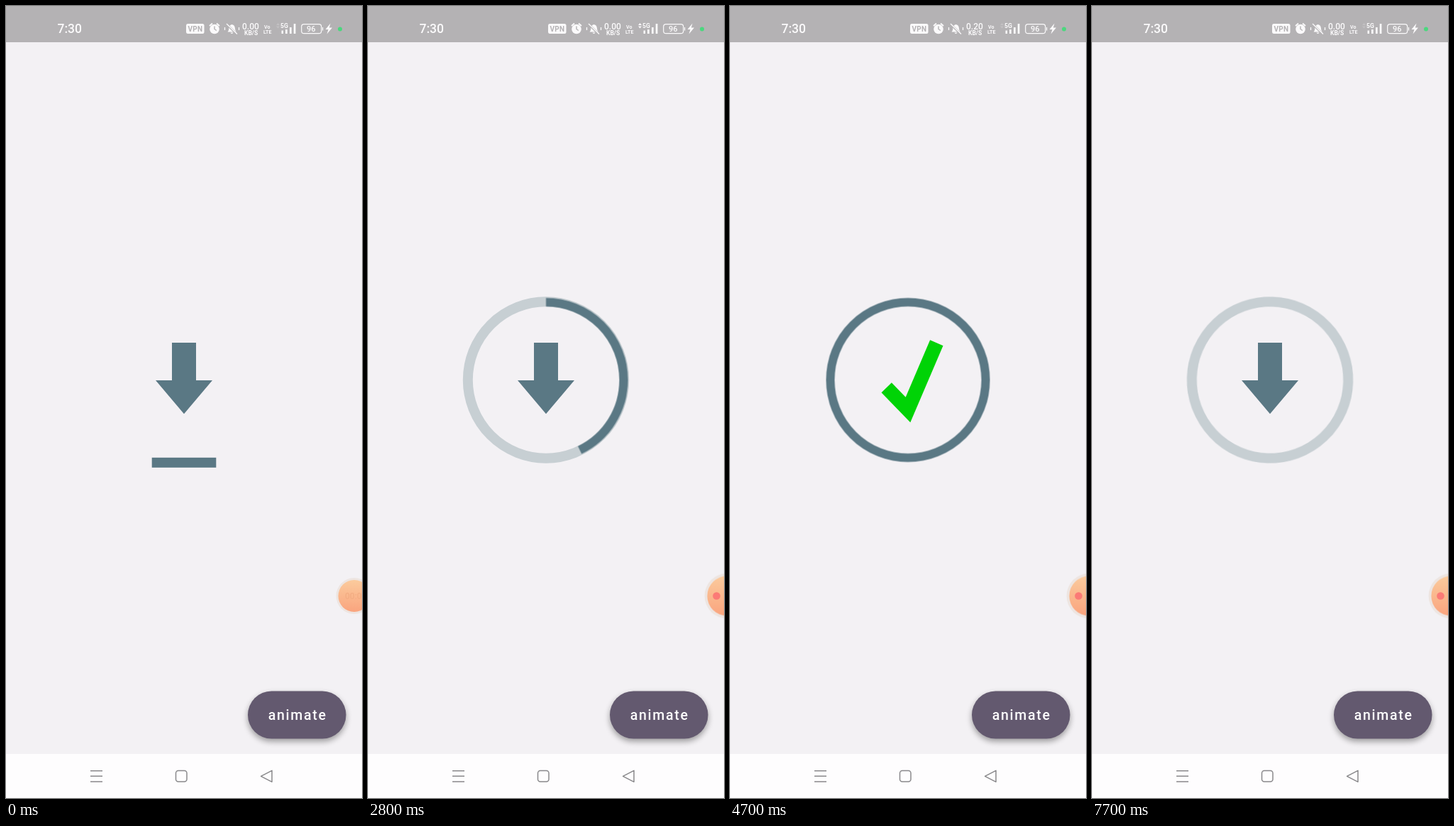
These frames come from a looping animation (502x1115 px, 8000 ms). An HTML page without scripts:

```html
<!DOCTYPE html>
<html lang="en">
<head>
<meta charset="utf-8">
<title>Download animation</title>
<style>
html, body { margin: 0; width: 100%; height: 100%; overflow: hidden; background: #f3f1f4; }
svg { display: block; width: 502px; height: 1115px; font-family: Roboto, sans-serif; font-weight: 500; }

/* Every animation shares one 8 s timeline; .again replays the tap 5.5 s later. */
.a { animation: 8s linear infinite; }
.again { animation-delay: -2.5s; }
.steps { animation-timing-function: step-end; }
.ring { fill: none; stroke: #c7cfd3; stroke-width: 14; }
.done { stroke: #5a7884; stroke-width: 12; }

.dip { animation-name: dip; animation-timing-function: cubic-bezier(.4, 0, .2, 1); }
@keyframes dip {
  0%, 10.5% { transform: none; }
  14.25% { transform: translateY(64px); }
  17.3%, 100% { transform: none; }
}
.toss { animation-name: toss; animation-timing-function: ease-in-out; }
@keyframes toss {
  0%, 42.5% { transform: none; }
  46.5% { transform: translateY(50px); }
  52.5% { transform: translateY(-47px); }
  52.6%, 100% { transform: none; }
}
.arrow { animation-name: arrow; }
@keyframes arrow { 0% { opacity: 1; } 52.5% { opacity: 0; } 65%, 100% { opacity: 1; } }
.bar { animation-name: bar; }
@keyframes bar { 0% { opacity: 1; } 17.3% { opacity: 0; } 65% { opacity: 1; } 86.1%, 100% { opacity: 0; } }

.arc-life { animation-name: arc-life; }
@keyframes arc-life { 0% { opacity: 0; } 17.35% { opacity: 1; } 31.25%, 100% { opacity: 0; } }
.arc { animation-name: arc; }
@keyframes arc {
  0%, 17.31% { stroke-dasharray: 0 360; stroke-dashoffset: 0; }
  27.31%, 100% { stroke-dasharray: 360 0; stroke-dashoffset: 180; }
}
.track { animation-name: track; }
@keyframes track { 0% { opacity: 0; } 29% { opacity: 1; } 42.5%, 100% { opacity: 0; } }
.done-life { animation-name: done-life; }
@keyframes done-life { 0% { opacity: 0; } 29.5% { opacity: 1; } 65%, 100% { opacity: 0; } }
.done { animation-name: done; }
@keyframes done {
  0%, 29.4% { stroke-dasharray: 0 360; }
  42.5%, 100% { stroke-dasharray: 360 0; }
}
.tick-life { animation-name: tick-life; }
@keyframes tick-life { 0% { opacity: 0; } 52.5% { opacity: 1; } 65%, 100% { opacity: 0; } }
.tick { stroke-dasharray: 100 200; animation-name: tick; }
@keyframes tick { 0%, 52% { stroke-dashoffset: 100; } 55%, 100% { stroke-dashoffset: 0; } }

.ripple { animation-name: ripple; }
@keyframes ripple {
  0%, 10.5% { r: 20px; opacity: 0; }
  10.8% { r: 24px; opacity: .22; }
  11.25% { r: 29px; opacity: .22; }
  14% { r: 105px; opacity: .2; }
  17%, 100% { r: 105px; opacity: 0; }
}
.press { animation-name: press; }
@keyframes press { 0%, 10.2% { opacity: 0; } 11.2%, 13% { opacity: 1; } 17%, 100% { opacity: 0; } }

.idle { animation-name: idle; }
@keyframes idle { 0% { opacity: 1; } 40% { opacity: 0; } 80%, 100% { opacity: 1; } }
.busy { animation-name: busy; }
@keyframes busy { 0% { opacity: 0; } 40% { opacity: 1; } 80%, 100% { opacity: 0; } }
.traffic { animation-name: traffic; }
@keyframes traffic { 0% { opacity: .2; } 18.75% { opacity: 1; } 37.5%, 100% { opacity: .2; } }

.bubble { transform-origin: 491px 830.5px; animation-name: bubble; }
@keyframes bubble {
  0%, 1.25% { transform: none; }
  4%, 100% { transform: translateX(15.5px) scale(1.25); }
}
.timer { animation-name: timer; }
@keyframes timer { 0%, 1.25% { opacity: 1; } 3%, 100% { opacity: 0; } }
.dot { animation-name: dot; }
@keyframes dot { 0%, 2% { opacity: 0; } 4%, 100% { opacity: 1; } }
</style>
</head>
<body>
<svg viewBox="0 0 502 1115">
  <defs>
    <linearGradient id="peach" x2="0" y2="1">
      <stop stop-color="#fbcb9d"/><stop offset="1" stop-color="#faa47e"/>
    </linearGradient>
    <filter id="blur" x="-20%" y="-40%" width="140%" height="180%"><feGaussianBlur stdDeviation="4"/></filter>
    <rect id="pill" x="341" y="964.5" width="138.5" height="67" rx="33.5"/>
    <clipPath id="pill-clip"><use href="#pill"/></clipPath>
  </defs>

  <!-- status bar -->
  <rect width="502" height="51" fill="#b4b2b4"/>
  <g fill="#fbfafb">
    <text x="72.5" y="38.3" font-size="17.5">7:30</text>
    <rect x="254" y="25" width="25.5" height="14" rx="2.5"/>
    <text x="256.5" y="35.7" font-size="10" font-weight="700" fill="#b4b2b4" letter-spacing=".2">VPN</text>
    <circle cx="294" cy="32.5" r="6.8"/>
    <path d="M287 28l4-3.5M301 28l-4-3.5" stroke="#fbfafb" stroke-width="1.8"/>
    <path d="M294 28.5v4l2.8 2" fill="none" stroke="#b4b2b4" stroke-width="1.4"/>
    <path d="M312.5 36.5c2-2 1.500-4 2-6.500q1-3.500 4-4 3.500.5 4.200 4 .2 4 2 6.500zM316.500 37.500h4q-2 3-4 0z"/>
    <path d="M311 25.500l14.500 14" stroke="#b4b2b4" stroke-width="3"/>
    <path d="M311 25l15 14.500M308.500 30v4M328.500 30v4" stroke="#fbfafb" stroke-width="1.3"/>
    <g font-size="12">
      <text class="a steps idle" x="333" y="33.300">0.00</text>
      <text class="a steps busy" x="333" y="33.300">0.20</text>
    </g>
    <text x="336" y="41" font-size="8.500" font-weight="700">KB/S</text>
    <g font-size="7" font-weight="700">
      <text x="364" y="31.500">Vo</text><text x="363" y="39">LTE</text>
    </g>
    <path class="a steps traffic" d="M381 27l2.500-3 2.500 3zM381 28.500h5l-2.500 3z"/>
    <text x="387" y="31.300" font-size="8.500" font-weight="700">5G</text>
    <path d="M388.500 34.500h2.500V39h-2.500zM394 33h2.700v6H394zM400 30h2.700v9H400zM405.700 25h2.700v14h-2.700z"/>
    <rect x="416.700" y="25.700" width="28" height="13" rx="3.500" fill="none" stroke="#fbfafb" stroke-width="1.200"/>
    <path d="M446 30h1.200v4.500H446z"/>
    <text x="424" y="36.300" font-size="11">96</text>
    <path d="M457.500 24.500l-7 8.500h4l-2 6.500 7.500-9h-4.200z"/>
  </g>
  <circle cx="471" cy="32.500" r="3" fill="#4bd77e"/>

  <!-- download icon -->
  <g class="a steps arc-life"><circle class="a ring arc" cx="251" cy="526.5" r="110.200" pathLength="360" transform="rotate(91.600 251 526.500)"/></g>
  <g class="a again steps arc-life"><circle class="a again ring arc" cx="251" cy="526.5" r="110.200" pathLength="360" transform="rotate(91.600 251 526.500)"/></g>
  <circle class="a steps ring track" cx="251" cy="526.5" r="110.200"/>
  <g class="a steps done-life"><circle class="a ring done" cx="251" cy="526.5" r="109.500" pathLength="360" transform="rotate(-90 251 526.500)"/></g>
  <g fill="#5a7884">
    <rect class="a steps bar" x="205.700" y="635.800" width="90.600" height="14"/>
    <g class="a dip"><g class="a again dip"><g class="a toss">
      <path class="a steps arrow" d="M234 474h34v53h23l-40 47.300-40-47.300h23z"/>
    </g></g></g>
  </g>
  <g class="a steps tick-life">
    <path class="a tick" d="M220.700 537.200L251 568.500 291.300 474.300" pathLength="100" fill="none" stroke="#00d306" stroke-width="20"/>
  </g>

  <!-- floating recorder bubble -->
  <g class="a bubble">
    <circle cx="491" cy="830.500" r="25.500" fill="#ede5e1"/>
    <circle cx="491" cy="830.500" r="22.500" fill="url(#peach)"/>
  </g>
  <text class="a timer" x="478" y="835" font-size="12" fill="#f3ad83">00:01</text>
  <circle class="a dot" cx="491.500" cy="830.500" r="5.300" fill="#fb7a76"/>

  <!-- button -->
  <use href="#pill" y="4" fill="#000" opacity=".36" filter="url(#blur)"/>
  <g class="a press"><use href="#pill" y="8" fill="#000" opacity=".2" filter="url(#blur)"/></g>
  <g class="a again press"><use href="#pill" y="8" fill="#000" opacity=".2" filter="url(#blur)"/></g>
  <use href="#pill" fill="#63596f"/>
  <g clip-path="url(#pill-clip)" fill="#fff">
    <g class="a press"><use href="#pill" opacity=".05"/></g>
    <g class="a again press"><use href="#pill" opacity=".05"/></g>
    <circle class="a ripple" cx="437" cy="1004" r="20"/>
    <circle class="a again ripple" cx="437" cy="1004" r="20"/>
  </g>
  <text x="369.700" y="1005" font-size="19.500" letter-spacing="1.740" fill="#fff">animate</text>

  <!-- navigation bar -->
  <rect y="1053" width="502" height="62" fill="#fefdfe"/>
  <g fill="none" stroke="#89888b" stroke-width="1.500" stroke-linejoin="round">
    <path d="M119 1076.700h17M119 1084.300h17M119 1092h17M359.500 1084.300l15.500-8v16z"/>
    <rect x="239.500" y="1076.500" width="15.500" height="15.500" rx="3.500"/>
  </g>
</svg>
</body>
</html>
```
